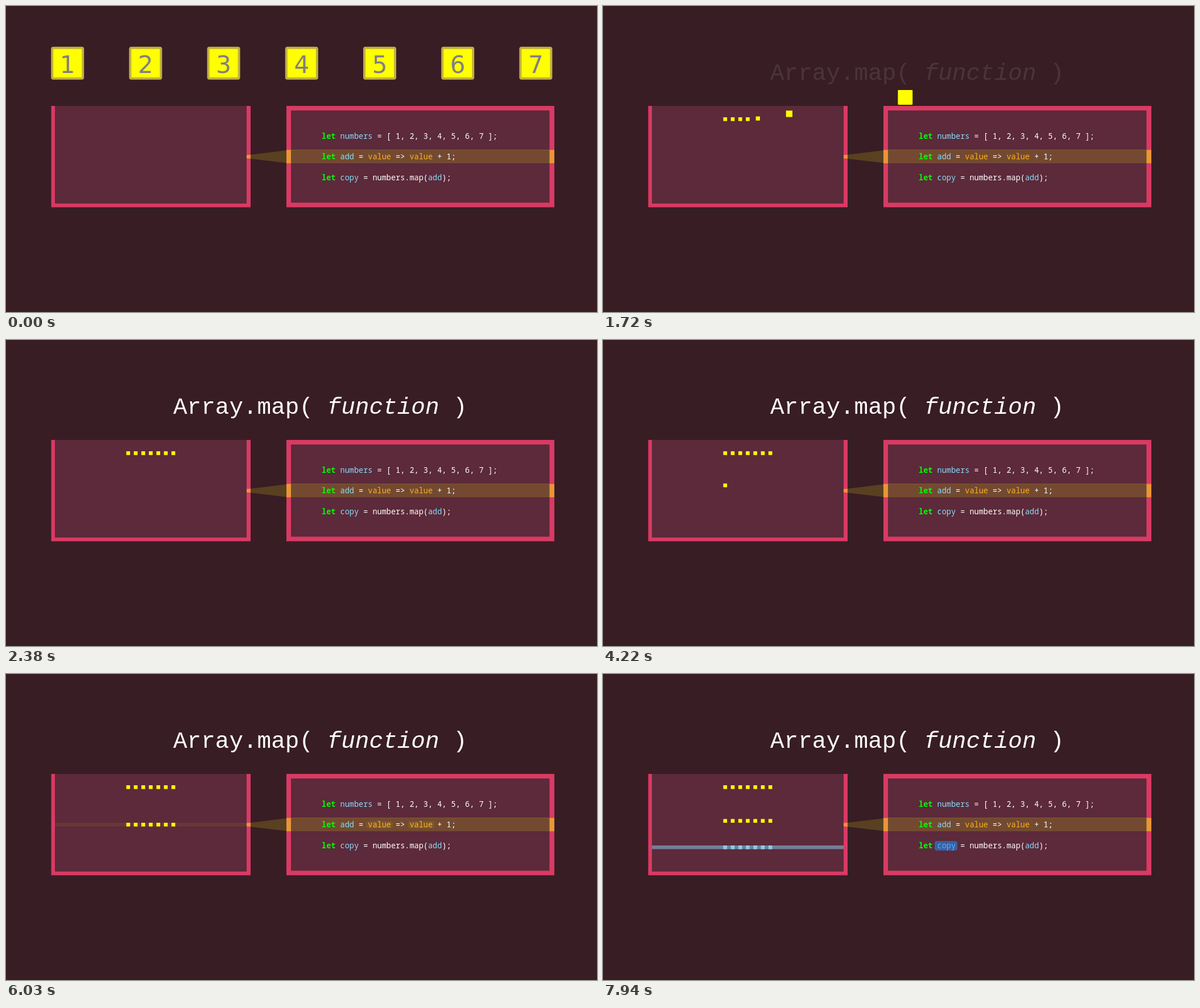
An HTML page that plays this animation: 1039x539 px, repeating every 7990 ms.

```html
<!DOCTYPE html>
<html lang="en">
<head>
<meta charset="utf-8">
<title>Mapping an array</title>
<style>
  html, body { margin: 0; width: 100%; height: 100%; overflow: hidden; background: #381d25; }
  svg { display: block; width: 100vw; height: 100vh; }
  text { white-space: pre; }
  .code { font: 13.55px "Noto Sans Mono", "DejaVu Sans Mono", monospace; font-weight: 500; fill: #fff; }
  .key { fill: #0f0; font-weight: 700; }
  .name { fill: #87dcfa; }
  .arg { fill: #ffb01e; }
  .digit { font: 42px "DejaVu Sans", sans-serif; fill: #808080; text-anchor: middle; }
  .title { font: 41px "Courier New", "Liberation Mono", monospace; fill: #fff; }
</style>
</head>
<body>
<svg viewBox="0 0 1039 539">
  <rect width="1039" height="539" fill="#381d25"/>

  <path d="M79.5 176H430V354.5H79.5Z" fill="#d93a64"/>
  <path d="M86 176H423V348H86Z" fill="#5c2a3a"/>
  <path d="M493 176H964V354.5H493Z" fill="#d93a64"/>
  <path d="M501 184H955.5V346.5H501Z" fill="#5c2a3a"/>

  <path d="M430 262L493 254.3V276.5L430 269Z" fill="#594020"/>
  <path d="M423 262.5L430 262V269L423 268.3Z" fill="#e99636"/>
  <path d="M493 253.5H964V277H493Z" fill="#e99636"/>
  <path d="M501 253.5H955.5V277H501Z" fill="#734a31"/>

  <g class="code">
    <text x="555" y="234"><tspan class="key">let</tspan> <tspan class="name">numbers</tspan> = [ 1, 2, 3, 4, 5, 6, 7 ];</text>
    <text x="555" y="270.3"><tspan class="key">let</tspan> <tspan class="name">add</tspan> = <tspan class="arg">value</tspan> =&gt; <tspan class="arg">value</tspan> + 1;</text>
    <text x="555" y="306.5"><tspan class="key">let</tspan> <tspan class="name">copy</tspan> = numbers.map(<tspan class="name">add</tspan>);</text>
  </g>

  <text id="title" class="title" x="294" y="130">Array.map( <tspan font-style="italic">function</tspan> )</text>

  <g id="copies"></g>
  <g id="boxes"></g>

  <g id="passFlash" fill="#ff0">
    <path d="M86 262H423V268.6H86Z"/>
    <rect x="633" y="259" width="47" height="13" rx="4"/>
    <rect x="707" y="259" width="47" height="13" rx="4"/>
  </g>
  <g id="copyFlash">
    <path d="M86 302H423V308.4H86Z" fill="#87ceeb"/>
    <rect x="583" y="294.3" width="40" height="16.7" rx="4" fill="#1e90ff"/>
  </g>
</svg>
<script>
const LOOP = 7990, COUNT = 7, DOT = 6.6;
const FALL = 250, FADE = 290;
const flyStart = [960, 1085, 1170, 1275, 1378, 1466, 1576];
const popStart = i => 15 + 103 * i;
const passStart = i => 4010 + 250 * i;
const copyStart = i => 6760 + 132 * i;

const $ = id => document.getElementById(id);
const clamp = v => Math.max(0, Math.min(1, v));
const span = (t, start, length) => clamp((t - start) / length);
const mix = (a, b, p) => a + (b - a) * p;

// Overshoots by about half before settling
function backOut(u) {
  const v = u - 1;
  return 1 + 6 * v ** 3 + 5 * v ** 2;
}

// cubic-bezier(.25, .1, .25, 1)
function ease(x) {
  if (x <= 0 || x >= 1) return clamp(x);
  const curve = (a, b, s) => 3 * a * s * (1 - s) ** 2 + 3 * b * s * s * (1 - s) + s ** 3;
  let lo = 0, hi = 1;
  for (let k = 0; k < 24; k++) {
    const mid = (lo + hi) / 2;
    if (curve(.25, .25, mid) < x) lo = mid; else hi = mid;
  }
  return curve(.1, 1, lo);
}

function add(parent, tag, attrs) {
  const el = document.createElementNS("http://www.w3.org/2000/svg", tag);
  set(el, attrs);
  return parent.appendChild(el);
}

function set(el, attrs) {
  for (const key in attrs) el.setAttribute(key, attrs[key]);
}

const show = (el, on) => set(el, { visibility: on ? "visible" : "hidden" });

const items = Array.from({ length: COUNT }, (_, i) => {
  const cx = 108.2 + 137.2 * i;
  const slot = 211.5 + 13.23 * i;
  const dot = fill => add($("copies"), "rect", { x: slot, width: DOT, height: DOT, fill });
  const item = { cx, slot, result: dot("#87ceeb"), passed: dot("#ff0") };
  item.box = add($("boxes"), "rect", { fill: "#ff0", stroke: "#c0b13c" });
  item.digit = add($("boxes"), "text", { class: "digit", x: cx, y: 118 });
  item.digit.textContent = i + 1;
  return item;
});

function drawBox(item, i, t) {
  const flying = t >= flyStart[i];
  show(item.digit, !flying);
  if (flying) {
    const p = ease(span(t, flyStart[i], 400));
    const size = mix(58, DOT, p);
    set(item.box, {
      x: mix(item.cx - 33, item.slot, p), y: mix(68, 196, p),
      width: size, height: size, rx: 3 * (1 - p), "stroke-width": 0
    });
    return;
  }
  const size = mix(58, 66, backOut(span(t, popStart(i), 320))) - 4;
  set(item.box, {
    x: item.cx - size / 2, y: 100.8 - size / 2,
    width: size, height: size, rx: 2, "stroke-width": 4
  });
}

function drawCopies(item, i, t) {
  const hopped = t >= copyStart(i);
  show(item.passed, t >= passStart(i));
  set(item.passed, { y: hopped ? 255.4 : mix(202.6, 262, span(t, passStart(i), FALL)) });
  show(item.result, hopped);
  set(item.result, { y: mix(262, 302, span(t, copyStart(i), FALL)) });
}

// Strength of the glow left by the latest landing
function glow(t, start) {
  let level = 0;
  for (let i = 0; i < COUNT; i++) {
    const age = t - start(i) - FALL;
    if (age >= 0) level = Math.max(level, 1 - clamp(age / FADE));
  }
  return level;
}

function draw(t) {
  items.forEach((item, i) => {
    drawBox(item, i, t);
    drawCopies(item, i, t);
  });
  set($("title"), { opacity: ease(span(t, 1640, 800)) });
  set($("passFlash"), { opacity: .92 * glow(t, passStart) });
  set($("copyFlash"), { opacity: glow(t, copyStart) });
}

const begin = performance.now();
function tick() {
  draw((performance.now() - begin) % LOOP);
  requestAnimationFrame(tick);
}
tick();
</script>
</body>
</html>
```
